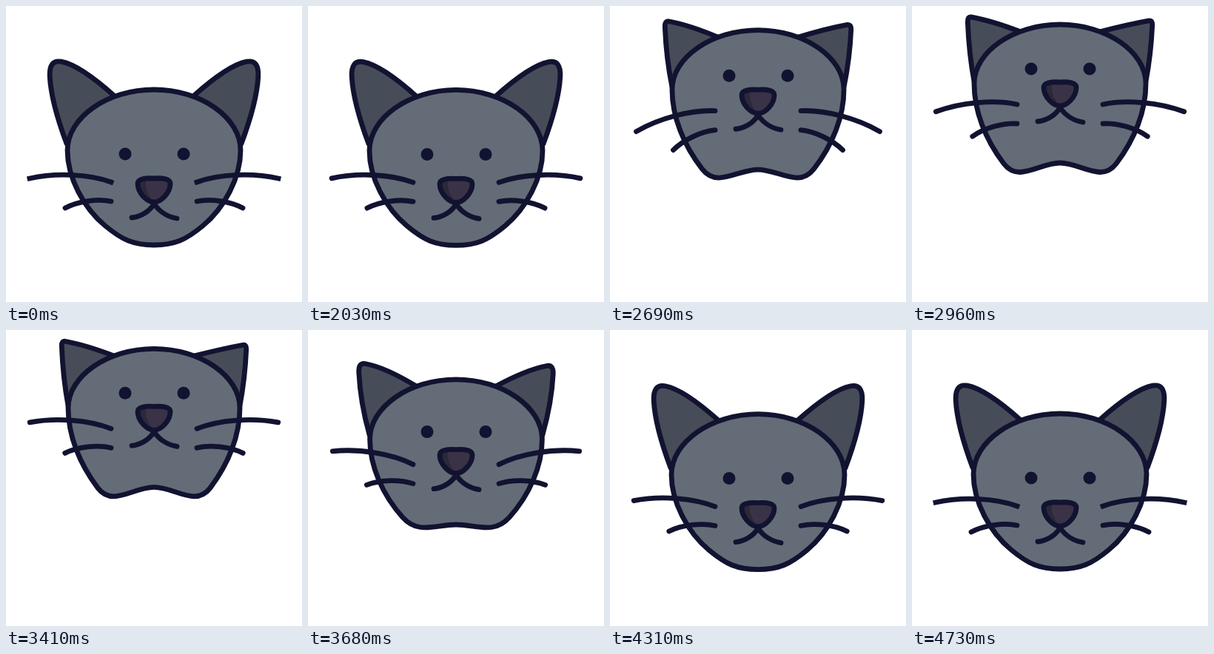
An HTML page that plays this animation: 400x400 px, repeating every 4760 ms.

```html
<!DOCTYPE html>
<html lang="en">
<head>
<meta charset="utf-8">
<title>Cat</title>
<style>
  html, body { margin: 0; width: 100%; height: 100%; overflow: hidden; background: #fff; }
  svg { display: block; width: 100vw; height: 100vh; }
</style>
</head>
<body>
<svg viewBox="0 0 400 400">
  <defs>
    <path id="upper" d="M0 0C-30 -11 -75 -13 -110 -5"/>
    <path id="lower" d="M0 0C-18 -4 -45 0 -62 9" stroke-linecap="round"/>
    <g id="whiskers">
      <g transform="translate(142 238)"><use class="hair" href="#upper" stroke-linecap="round"/></g>
      <g transform="translate(142 264)"><use class="hair" href="#lower"/></g>
    </g>
    <path id="nose" d="M200 233C188 232 178 234 178 240C178 252 190 265 200 265C210 265 222 252 222 240C222 234 212 232 200 233Z"/>
  </defs>
  <g id="cat" fill="none" stroke="#121331" stroke-width="6.8" stroke-linecap="round" stroke-linejoin="round">
    <path id="leftEar" fill="#474d58"/>
    <path id="rightEar" fill="#474d58" transform="translate(400 0) scale(-1 1)"/>
    <path id="head" fill="#646d77"/>
    <g id="eyes" fill="#121331" stroke="none">
      <circle cx="161" cy="200" r="8.5"/>
      <circle cx="240" cy="200" r="8.5"/>
    </g>
    <g id="muzzle">
      <use href="#nose" fill="#3a3347" stroke="none"/>
      <path fill="#2b2838" stroke="none" d="M190 233C174 233 176 248 200 265C192 257 186 243 190 233Z"/>
      <use href="#nose"/>
      <path d="M170 286C182 285 195 277 200 267C207 278 219 285 231 287"/>
    </g>
    <g id="hairs">
      <use href="#whiskers"/>
      <use href="#whiskers" transform="translate(400 0) scale(-1 1)"/>
    </g>
  </g>
</svg>
<script>
const LOOP = 4760, START = 2030, STEP = 30, STEPS = 90;
const $ = id => document.getElementById(id);
const mix = (a, b, u) => a + (b - a) * u;
const mixPoint = ([ax, ay], [bx, by], u) => [mix(ax, bx, u), mix(ay, by, u)];
const add = ([x, y], [dx, dy], scale = 1) => [x + dx * scale, y + dy * scale];

// Eased 0 to 1 between steps a and b; a bump eases up to its peak and back.
function ease(k, a, b) {
  const u = Math.min(1, Math.max(0, (k - a) / (b - a)));
  return u * u * (3 - 2 * u);
}
const bump = (k, from, peak, to) => ease(k, from, peak) - ease(k, peak, to);

const liftAt = k => ease(k, 7.6, 24.6) - ease(k, 47.2, 65.2);
const dipAt = k => 12 * bump(k, -1, 8, 27) + 11 * bump(k, 44, 63.5, 78);
const droopAt = k =>
  -7 * bump(k, -1, 7, 16) + 20 * bump(k, 7, 16, 42) - 7 * bump(k, 42, 54, 67)
  + 12 * bump(k, 54, 67, 79) - 4 * bump(k, 67, 79, 90);

// An ear has two curved sides that meet in a rounded tip.
function ear(lift, tilt) {
  const pose = (low, high) => mixPoint(low, high, lift);
  const inner = pose([147, 122], [147, 35]);
  const innerBend = pose([100, 80], [108, 20 + tilt]);
  const tip = pose([58, 72], [75, 14 + tilt]);
  const outerBend = pose([61, 130], [77, 65]);
  const outer = pose([82, 186], [84, 102]);
  const round = mix(0.4, 0.15, lift);
  return `M${inner}Q${innerBend} ${mixPoint(tip, innerBend, round)}`
    + `Q${tip} ${mixPoint(tip, outerBend, round)}Q${outerBend} ${outer}Z`;
}

// The head is an oval whose chin folds in as the jaw tightens.
function head(lift) {
  const pose = (low, high) => mixPoint(low, high, lift);
  const crown = pose([200, 113], [200, 25]);
  const side = pose([83, 195], [84, 105]);
  const jaw = pose([134, 297], [124, 213]);
  const jawSlope = pose([29, 24], [25, 33]);
  const chin = pose([200, 323], [200, 212]);
  const half = [
    crown, [mix(crown[0], side[0], 0.54), crown[1]], [side[0], mix(side[1], crown[1], 0.54)],
    side, add(side, [0, 37]), add(jaw, jawSlope, -1),
    jaw, add(jaw, jawSlope, 0.8), add(chin, [-28, 0]), chin
  ];
  const otherHalf = half.map(([x, y]) => [400 - x, y]).reverse();
  return `M${crown}C${half.slice(1)}C${otherHalf.slice(1)}Z`;
}

const set = (el, name, value) => el.setAttribute(name, value);
const move = (id, y) => set($(id), 'transform', `translate(0 ${y})`);

function draw(t) {
  const k = Math.floor((t - START) / STEP);
  const resting = k < 0 || k >= STEPS;
  const lift = liftAt(k), droop = droopAt(k);

  move('cat', dipAt(k));
  move('eyes', -115 * lift);
  move('muzzle', -130 * lift);
  move('hairs', -105 * lift);
  set($('leftEar'), 'd', ear(lift, 0));
  set($('rightEar'), 'd', ear(lift, 5));
  set($('head'), 'd', head(lift));
  document.querySelectorAll('.hair').forEach(hair => set(hair, 'transform', `rotate(${-droop})`));
  set($('upper'), 'stroke-linecap', resting ? 'square' : 'round');
}

const begin = performance.now();
function tick() {
  draw((performance.now() - begin) % LOOP);
  requestAnimationFrame(tick);
}
tick();
</script>
</body>
</html>
```
